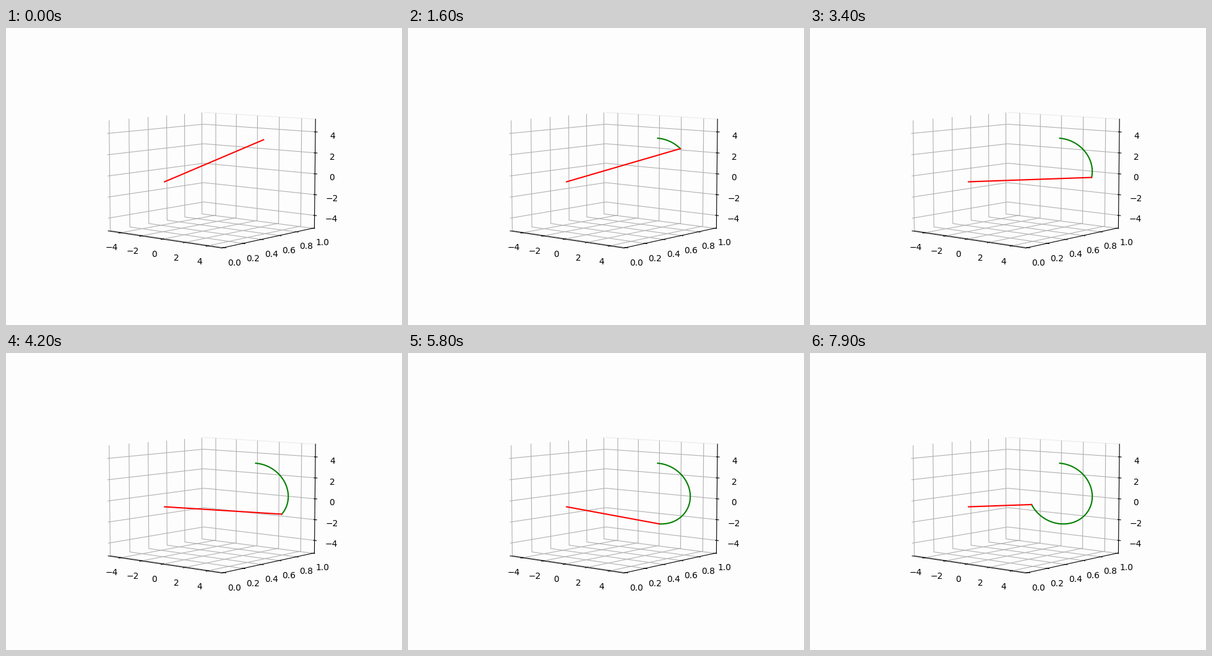
Recreate the animation shown at these times as a matplotlib script. Size 640x480 px, loop 8000 ms.

```python
import numpy as np
import matplotlib.pyplot as plt
from matplotlib.animation import FuncAnimation

BG = "#fdfdfd"
RADIUS = 3
STEP = 0.055          # radians per frame
REST_ANGLE = 0.246    # where the arm waits before it starts
FRAMES = 80

fig = plt.figure(figsize=(6.4, 4.8), dpi=100, facecolor=BG)
ax = fig.add_subplot(projection="3d", facecolor=BG)


def padded(lo, hi):
    pad = (hi - lo) / 48
    return lo - pad, hi + pad


ax.set_xlim(*padded(-5, 5))
ax.set_ylim(*padded(0, 1))
ax.set_zlim(*padded(-5, 5))
ax.view_init(elev=7, azim=-50)

# Unfilled walls; only the back one keeps a faint outline.
for axis, shade in ((ax.xaxis, 0.992), (ax.yaxis, 0.935), (ax.zaxis, 0.992)):
    axis.set_pane_color((shade, shade, shade, 1))
    axis.pane.set_fill(False)

trail, = ax.plot([], [], [], color="green", lw=1.5)
arm, = ax.plot([], [], [], color="red", lw=1.5)


def on_circle(angle):
    angle = np.asarray(angle, dtype=float)
    return RADIUS * np.sin(angle), np.ones_like(angle), RADIUS * np.cos(angle)


def update(frame):
    count = max(frame - 1, 0)
    angles = STEP * np.arange(count)
    trail.set_data_3d(*on_circle(angles))
    tip = on_circle(angles[-1] if count else REST_ANGLE)
    arm.set_data_3d(*([0, float(v)] for v in tip))
    return trail, arm


anim = FuncAnimation(fig, update, frames=FRAMES, interval=100,
                     init_func=lambda: update(0), repeat=True, blit=False)
plt.show()
```
